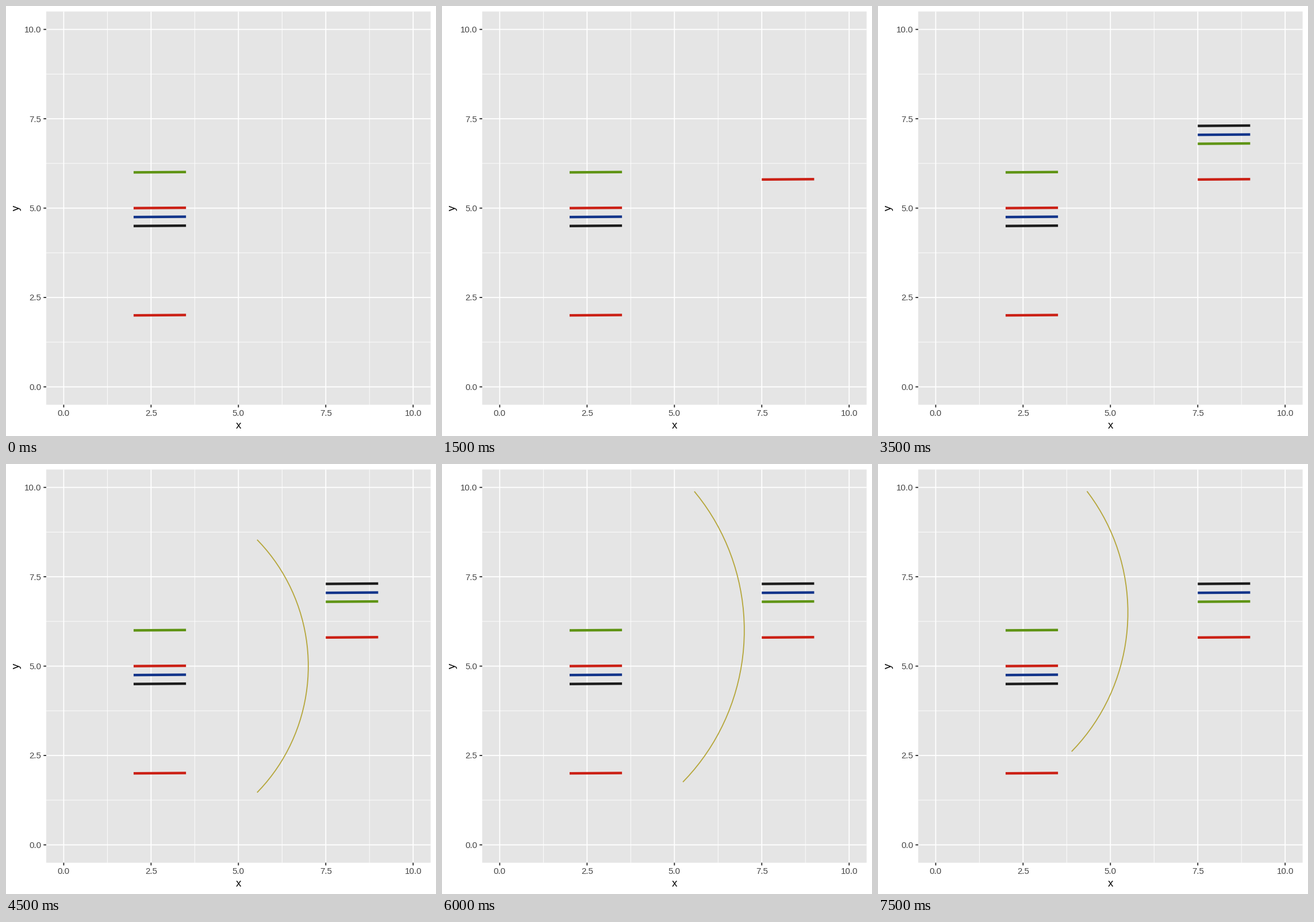
Write a matplotlib script that moves like this. It is 748 px wide and 748 px high and loops after 8 s.

```python
import numpy as np
import matplotlib.pyplot as plt
from matplotlib.animation import FuncAnimation

SIZE, DPI = 748, 68
PT = 72 / DPI  # points per pixel
LEFT, RIGHT, TOP, BOTTOM = 70, 738.6, 9.6, 693.6
RED, GREEN, BLUE, BLACK = "#cb2015", "#5f9414", "#12348a", "#1c1c1c"
GOLD = "#b5a63a"

plt.rcParams["font.family"] = "Liberation Sans"
fig = plt.figure(figsize=(SIZE / DPI, SIZE / DPI), dpi=DPI, facecolor="white")
ax = fig.add_axes([0, 0, 1, 1])
ax.set(xlim=(0, SIZE), ylim=(SIZE, 0))
ax.axis("off")


def px(x):
    return LEFT + (np.asarray(x) + 0.5) * (RIGHT - LEFT) / 11


def py(y):
    return BOTTOM - (np.asarray(y) + 0.5) * (BOTTOM - TOP) / 11


def line(xs, ys, color, width, z):
    return ax.plot(xs, ys, color=color, lw=width * PT, zorder=z, snap=False,
                   solid_capstyle="butt", solid_joinstyle="round")[0]


def label(x, y, text, size, color, **kw):
    ax.text(x, y, text, fontsize=size * PT, color=color, va="baseline", **kw)


def bar(x, y, color):
    return line(px([x, x + 1.5]), py([y, y + 0.01]), color, 4.4, 4)


def draw_panel():
    ax.add_patch(plt.Rectangle((LEFT, TOP), RIGHT - LEFT, BOTTOM - TOP,
                               fc="#e5e5e5", ec="none", snap=False))
    for v in np.arange(1.25, 10, 2.5):
        line([px(v)] * 2, [TOP, BOTTOM], "white", 0.92, 2)
        line([LEFT, RIGHT], [py(v)] * 2, "white", 0.92, 2)
    for v in np.arange(0, 10.1, 2.5):
        line([px(v)] * 2, [TOP, BOTTOM], "white", 1.83, 3)
        line([LEFT, RIGHT], [py(v)] * 2, "white", 1.83, 3)
        line([px(v)] * 2, [BOTTOM, BOTTOM + 4.7], "#2b2b2b", 1.83, 3)
        line([LEFT - 4.7, LEFT], [py(v)] * 2, "#2b2b2b", 1.83, 3)
        label(px(v), 713, f"{v:.1f}", 15, "#444444", ha="center")
        label(61.5, py(v) + 5.4, f"{v:.1f}", 15, "#444444", ha="right")
    label(404.3, 735, "x", 18.8, "black", ha="center")
    ax.text(23, 351.6, "y", fontsize=18.8 * PT, color="black", rotation=90,
            rotation_mode="anchor", ha="center", va="baseline")


draw_panel()
for y, color in [(6, GREEN), (5, RED), (4.75, BLUE), (4.5, BLACK), (2, RED)]:
    bar(2, y, color)

# Right-hand bars: colour and {step: height}, each height held until the next
MOVES = [(RED, {1: 6, 2: 5.6, 3: 5.8}), (GREEN, {4: 6.5, 5: 6.8}),
         (BLUE, {6: 7.05}), (BLACK, {7: 7.3})]
bars = [(bar(7.5, 0, color), steps) for color, steps in MOVES]

# Arc centre and radius, one per step
FIRST_ARC = 8
ARCS = [(2, 2, 5), (2, 5, 5), (2, 6, 5), (1, 6, 5),
        (1, 6, 6), (1, 6, 5.5), (0, 6, 5.5), (0, 6.5, 5.5)]
THETA = np.linspace(-np.pi / 4, np.pi / 4, 40)
arc = line([], [], GOLD, 1.8, 5)


def update(i):
    for seg, steps in bars:
        past = [s for s in steps if s <= i]
        seg.set_visible(bool(past))
        if past:
            y = steps[max(past)]
            seg.set_ydata(py([y, y + 0.01]))
    arc.set_visible(i >= FIRST_ARC)
    if i >= FIRST_ARC:
        cx, cy, r = ARCS[i - FIRST_ARC]
        x, y = cx + r * np.cos(THETA), cy + r * np.sin(THETA)
        keep = (y >= 0) & (y <= 10)  # points beyond the axis limits are dropped
        arc.set_data(px(x[keep]), py(y[keep]))
    return [seg for seg, _ in bars] + [arc]


anim = FuncAnimation(fig, update, frames=16, interval=500, repeat=True,
                     repeat_delay=0, init_func=lambda: update(0))
plt.show()
```
